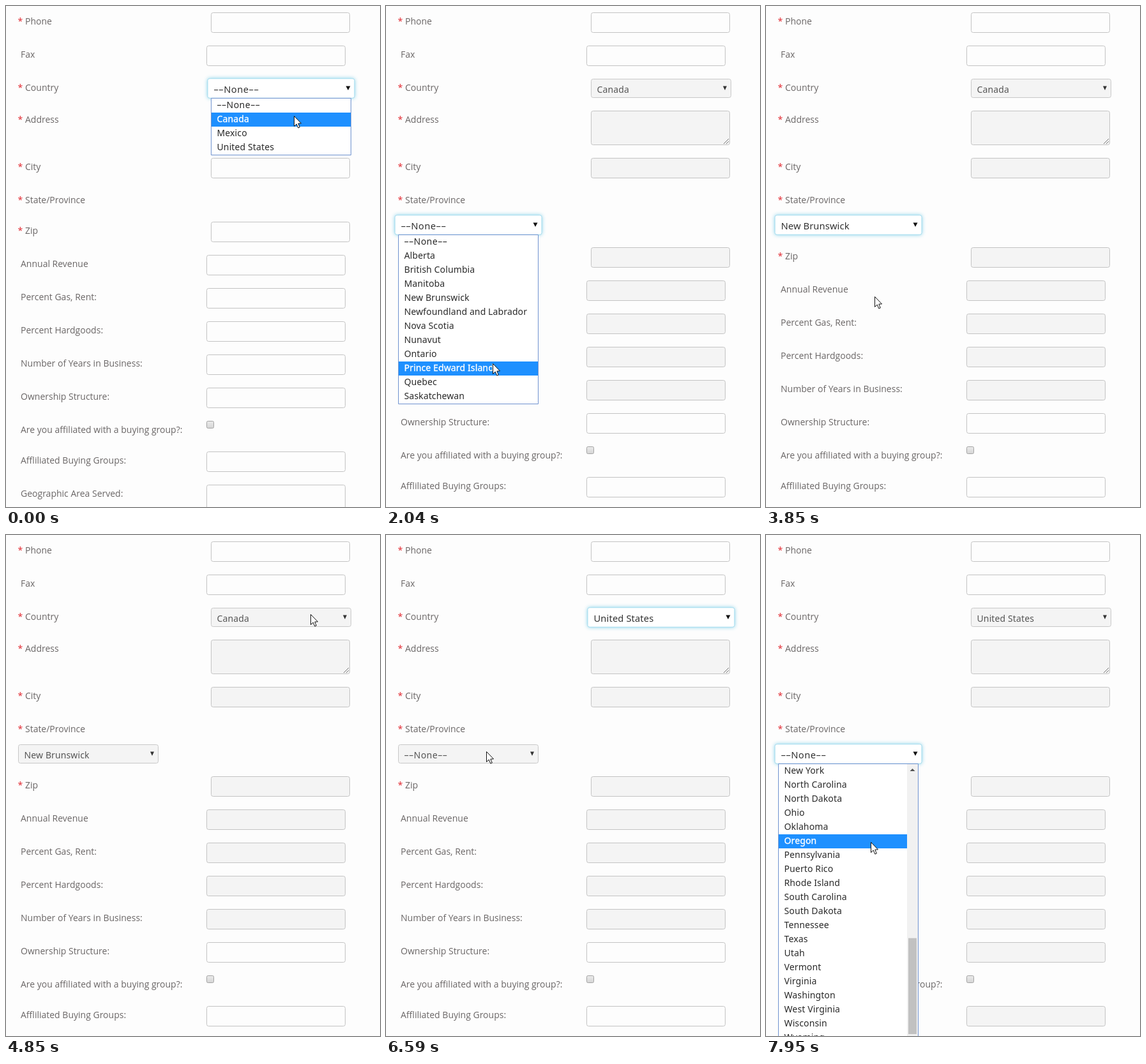
Recreate the animation shown at these times as an HTML page with a canvas. Size 586 by 785 pixels, loop 8000 ms.

```html
<!DOCTYPE html>
<html lang="en">
<head>
<meta charset="utf-8">
<title>Account form</title>
<style>
html, body { margin: 0; height: 100%; overflow: hidden; background: #fdfdfd; }
canvas { display: block; }
</style>
</head>
<body>
<canvas id="stage" width="586" height="785"></canvas>
<script>
const ctx = document.getElementById('stage').getContext('2d');
const LOOP = 8000, ROW = 22, MAX_ROWS = 20;
const PAGE = '#fdfdfd', GREY = '#f4f4f4', BLUE = '#1e90ff';
const NONE = '\u2013\u2013None\u2013\u2013';

// label, vertical centre, required, kind
const fields = [
  ['Phone', 24, 1, 'input'], ['Fax', 76, 0, 'input'], ['Country', 128, 1],
  ['Address', 178, 1, 'area'], ['City', 252, 1, 'input'], ['State/Province', 304, 1],
  ['Zip', 352, 1, 'input'], ['Annual Revenue', 404, 0, 'input'],
  ['Percent Gas, Rent:', 456, 0, 'input'], ['Percent Hardgoods:', 508, 0, 'input'],
  ['Number of Years in Business:', 560, 0, 'input'], ['Ownership Structure:', 612, 0, 'input'],
  ['Are you affiliated with a buying group?:', 664, 0, 'check'],
  ['Affliliated Buying Groups:', 712, 0, 'input'], ['Geographic Area Served:', 764, 0, 'area'],
];
const countries = [NONE, 'Canada', 'Mexico', 'United States'];
const regions = {
  Canada: [NONE, ...('Alberta,British Columbia,Manitoba,New Brunswick,Newfoundland and Labrador,Nova Scotia,' +
    'Nunavut,Ontario,Prince Edward Island,Quebec,Saskatchewan').split(',')],
  'United States': [NONE, ...('Alabama,Alaska,Arizona,Arkansas,California,Colorado,Connecticut,Delaware,' +
    'District of Columbia,Florida,Georgia,Guam,Hawaii,Idaho,Illinois,Indiana,Iowa,Kansas,Kentucky,Louisiana,' +
    'Maine,Maryland,Massachusetts,Michigan,Minnesota,Mississippi,Missouri,Montana,Nebraska,Nevada,' +
    'New Hampshire,New Jersey,New Mexico,New York,North Carolina,North Dakota,Ohio,Oklahoma,Oregon,' +
    'Pennsylvania,Puerto Rico,Rhode Island,South Carolina,South Dakota,Tennessee,Texas,Utah,Vermont,' +
    'Virginia,Washington,West Virginia,Wisconsin,Wyoming').split(',')],
};
const selects = { country: [321, 114], region: [19, 328] };

// Each step changes part of the state; cursor is the arrow tip.
const steps = [
  [0, { country: NONE, region: NONE, focus: 'country', open: 'country', hover: 1, scroll: 0,
        wide: false, dim: false, extended: false, grey: 0, cursor: [451, 172] }],
  [430, { country: 'Canada', open: '' }],
  [550, { extended: true, grey: 1, cursor: [430, 200] }],
  [690, { cursor: [330, 270] }],
  [820, { cursor: [182, 342] }],
  [980, { open: 'region', hover: 0, dim: true }],
  [1100, { focus: 'region', dim: false, cursor: [181, 362] }],
  [1230, { hover: 4, cursor: [179, 455] }],
  [1370, { hover: 7, cursor: [177, 522] }],
  [1490, { hover: 9, cursor: [175, 570] }],
  [1620, { hover: 11, cursor: [173, 615] }],
  [1760, { cursor: [172, 636] }],
  [1900, { hover: 10, cursor: [169, 588] }],
  [2040, { hover: 9, cursor: [167, 560] }],
  [2600, { open: '', region: 'Prince Edward Island' }],
  [2730, { cursor: [168, 500] }],
  [2860, { cursor: [171, 410] }],
  [2990, { cursor: [174, 345] }],
  [3120, { open: 'region', wide: true }],
  [3400, { hover: 1, cursor: [175, 390] }],
  [3540, { hover: 3, cursor: [172, 430] }],
  [3680, { hover: 4, cursor: [170, 455] }],
  [3820, { open: '', wide: false, region: 'New Brunswick' }],
  [3980, { cursor: [230, 385] }],
  [4130, { cursor: [330, 290] }],
  [4280, { cursor: [420, 195] }],
  [4420, { cursor: [462, 144] }],
  [4550, { focus: '', cursor: [474, 130] }],
  [4700, { cursor: [477, 124] }],
  [4970, { open: 'country', hover: 1, dim: true }],
  [5100, { focus: 'country', dim: false }],
  [5230, { cursor: [473, 150] }],
  [5350, { cursor: [467, 174] }],
  [5480, { hover: 2, cursor: [461, 192] }],
  [5630, { hover: 3, cursor: [457, 211] }],
  [5910, { open: '', country: 'United States', region: NONE }],
  [6190, { cursor: [357, 255] }],
  [6320, { cursor: [240, 366] }],
  [6460, { cursor: [147, 350] }],
  [6590, { cursor: [157, 339] }],
  [7020, { open: 'region', hover: 0, dim: true, grey: 2 }],
  [7170, { focus: 'region', dim: false }],
  [7440, { hover: 3, cursor: [160, 432] }],
  [7570, { hover: 14, scroll: 9, cursor: [164, 481] }],
  [7700, { hover: 23, scroll: 18 }],
  [7820, { hover: 32, scroll: 27 }],
  [7950, { hover: 39, scroll: 34 }],
];

function box(x, y, w, h, fill, stroke, radius = 0) {
  ctx.beginPath();
  ctx.roundRect(x + .5, y + .5, w - 1, h - 1, radius);
  ctx.fillStyle = fill;
  ctx.fill();
  ctx.shadowBlur = 0;
  ctx.strokeStyle = stroke;
  ctx.stroke();
}

function rect(x, y, w, h, color) {
  ctx.fillStyle = color;
  ctx.fillRect(x, y, w, h);
}

function polygon(points, color) {
  ctx.beginPath();
  points.forEach(([x, y]) => ctx.lineTo(x, y));
  ctx.closePath();
  ctx.fillStyle = color;
  ctx.fill();
}

function label(text, x, y, color = '#6a6666') {
  ctx.font = '14px "Open Sans", sans-serif';
  ctx.letterSpacing = '0px';
  ctx.fillStyle = color;
  ctx.fillText(text, x, y);
}

function option(text, x, y, color, size = 14, bold = false) {
  ctx.font = size + 'px "Noto Sans", sans-serif';
  ctx.letterSpacing = text === NONE ? '0.5px' : '0.12px';
  ctx.fillStyle = ctx.strokeStyle = color;
  ctx.fillText(text, x, y);
  if (bold) {
    ctx.lineWidth = .35;
    ctx.strokeText(text, x, y);
    ctx.lineWidth = 1;
  }
}

function drawField([text, centre, required, kind], index, s) {
  const y = centre + (s.extended && index > 5 ? 40 : 0);
  const x = required ? 321 : 314;
  if (required) label('*', 18.5, y + 5, '#e0242c');
  label(text, required ? 30 : 23, y + 5);
  const grey = index > 2 && (s.grey === 2 || s.grey === 1 && index < 11);
  if (kind === 'check') {
    const shade = ctx.createLinearGradient(0, y - 14, 0, y - 2);
    shade.addColorStop(0, '#ececec');
    shade.addColorStop(1, '#d4d4d4');
    box(x, y - 14, 12, 12, shade, '#a3a3a3', 2);
  } else if (kind) {
    const h = kind === 'area' ? 54 : 32;
    box(x, y - 14, 218, h, grey ? GREY : PAGE, '#c3c3c3', 3);
    if (kind === 'area') {
      ctx.beginPath();
      for (const d of [8, 4]) {
        ctx.moveTo(x + 216 - d, y + h - 16);
        ctx.lineTo(x + 216, y + h - 16 - d);
      }
      ctx.strokeStyle = '#777';
      ctx.stroke();
    }
  }
}

function drawSelect(name, s) {
  const [x, y] = selects[name];
  const focused = s.focus === name;
  if (focused) {
    ctx.shadowColor = 'rgba(80,190,225,.8)';
    ctx.shadowBlur = 6;
    box(x - 5.5, y - .75, 231, 31.5, '#fff', '#a5dcee', 3);
  } else {
    box(x, y, 220, 30, GREY, '#c8c8c8', 3);
  }
  option(s[name], focused ? x + 4.5 : x + 9.5, y + 22, focused ? '#333' : '#555', focused ? 14.7 : 14);
  const ax = x + (focused ? 215 : 210), half = focused ? 3.5 : 3;
  polygon([[ax - half, y + 11.5], [ax + half, y + 11.5], [ax, y + 18]], focused ? '#111' : '#333');
}

function drawList(name, s) {
  const items = name === 'country' ? countries : regions[s.country];
  const grow = s.wide ? 1 : 0;
  const x = selects[name][0] - grow * 6;
  const top = selects[name][1] + 30 + grow;
  const w = 220 + grow * 11;
  const count = Math.min(items.length, MAX_ROWS);
  const scrolls = items.length > MAX_ROWS;
  box(x, top, w, count * ROW + 2, s.dim ? GREY : '#fff', '#6f92cf');
  for (let i = 0; i < count; i++) {
    const index = i + s.scroll, y = top + 1 + i * ROW, active = index === s.hover;
    if (active) rect(x + 1, y, w - (scrolls ? 19 : 2), ROW, BLUE);
    option(items[index], x + 9.5, y + 15, active ? '#fff' : s.dim ? '#444' : '#2a2a2a', 14, active);
  }
  if (scrolls) {
    const track = count * ROW - 34, unit = track / items.length;
    rect(x + w - 18, top + 1, 17, count * ROW, '#f1f1f1');
    rect(x + w - 16, top + 18 + s.scroll * unit, 13, count * unit, '#c1c1c1');
    const ax = x + w - 9.5;
    polygon([[ax - 4, top + 12], [ax, top + 8], [ax + 4, top + 12]], '#505050');
  }
}

function drawCursor([x, y]) {
  const shape = [[0, 0], [0, 16], [3.7, 12.5], [6.3, 18.5], [8.8, 17.5], [6.3, 11.6], [11, 11.4]];
  polygon(shape.map(([dx, dy]) => [x + .5 + dx, y + .5 + dy]), '#fff');
  ctx.strokeStyle = '#111';
  ctx.stroke();
}

function draw(now) {
  const t = now % LOOP;
  const s = Object.assign({}, ...steps.filter(step => step[0] <= t).map(step => step[1]));
  rect(0, 0, 586, 785, PAGE);
  fields.forEach((field, index) => drawField(field, index, s));
  drawSelect('country', s);
  if (s.extended) drawSelect('region', s);
  if (s.open) drawList(s.open, s);
  drawCursor(s.cursor);
  requestAnimationFrame(draw);
}
requestAnimationFrame(draw);
</script>
</body>
</html>
```
